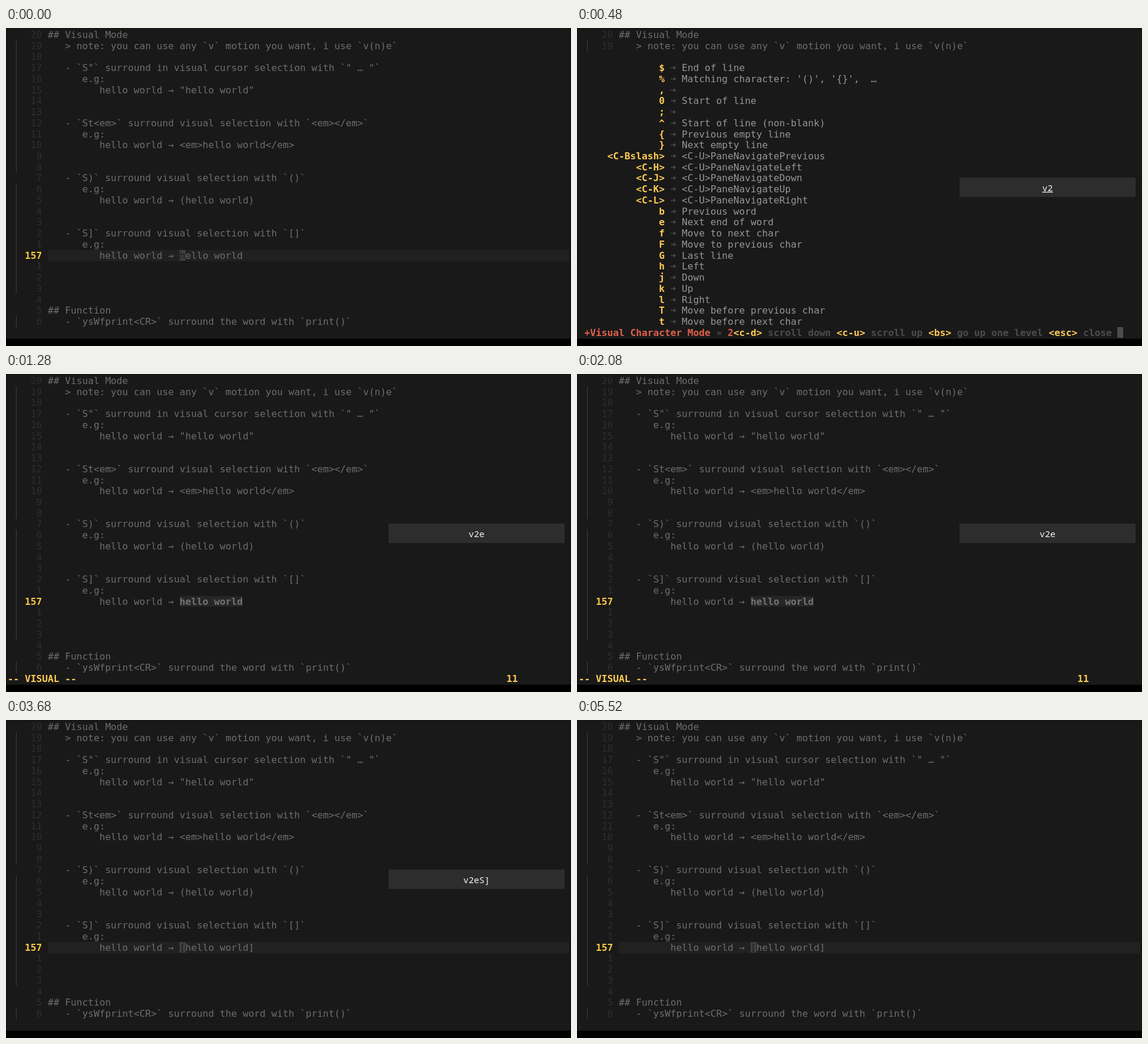
Recreate the animation shown at these times as an HTML page with a canvas. Size 960 px wide and 540 px high, loop 5.6 s.

```html
<!DOCTYPE html>
<html lang="en">
<head>
<meta charset="utf-8">
<title>Surround a selection</title>
<style>
html, body { margin: 0; width: 100%; height: 100%; overflow: hidden; background: #000; }
canvas { display: block; width: 960px; height: 540px; }
</style>
</head>
<body>
<canvas id="stage" width="960" height="540"></canvas>
<script>
const ctx = document.getElementById('stage').getContext('2d');
const LOOP = 5600;
const CW = 9.74, RH = 18.73, LEFT = 2.8, TOP = 2;
const MONO = '"DejaVu Sans Mono", monospace';
const C = {
  bg: '#191919', edge: '#121212', text: '#6d6d6e', num: '#2e2e2e', bar: '#3f3f3f',
  line: '#212121', select: '#262626', strong: '#747475', block: '#404040', ink: '#1d1d1d',
  gold: '#fcc93f', key: '#ffcb55', desc: '#969696', dim: '#4c4c4c', red: '#e0604a'
};

const DOC = [
  '## Visual Mode',
  '   > note: you can use any `v` motion you want, i use `v(n)e`',
  '',
  '   - `S"` surround in visual cursor selection with `" … "`',
  '      e.g:',
  '         hello world → "hello world"',
  '', '',
  '   - `St<em>` surround visual selection with `<em></em>`',
  '      e.g:',
  '         hello world → <em>hello world</em>',
  '', '',
  '   - `S)` surround visual selection with `()`',
  '      e.g:',
  '         hello world → (hello world)',
  '', '',
  '   - `S]` surround visual selection with `[]`',
  '      e.g:',
  '         hello world → ',
  '', '', '', '',
  '## Function',
  '   - `ysWfprint<CR>` surround the word with `print()`'
];

const HINTS = [
  ['$', 'End of line'],
  ['%', "Matching character: '()', '{}',  …"],
  [',', ''],
  ['0', 'Start of line'],
  [';', ''],
  ['^', 'Start of line (non-blank)'],
  ['{', 'Previous empty line'],
  ['}', 'Next empty line'],
  ['<C-Bslash>', '<C-U>PaneNavigatePrevious'],
  ['<C-H>', '<C-U>PaneNavigateLeft'],
  ['<C-J>', '<C-U>PaneNavigateDown'],
  ['<C-K>', '<C-U>PaneNavigateUp'],
  ['<C-L>', '<C-U>PaneNavigateRight'],
  ['b', 'Previous word'],
  ['e', 'Next end of word'],
  ['f', 'Move to next char'],
  ['F', 'Move to previous char'],
  ['G', 'Last line'],
  ['h', 'Left'],
  ['j', 'Down'],
  ['k', 'Up'],
  ['l', 'Right'],
  ['T', 'Move before previous char'],
  ['t', 'Move before next char']
];

const FOOTER = [
  [1, '+Visual Character Mode', C.red], [24, '»', C.dim], [26, '2', C.red],
  [27, '<c-d>', C.key], [33, 'scroll down', C.dim],
  [45, '<c-u>', C.key], [51, 'scroll up', C.dim],
  [61, '<bs>', C.key], [66, 'go up one level', C.dim],
  [82, '<esc>', C.key], [88, 'close', C.dim]
];

const ROW = 20, COL = 30;
const colX = c => LEFT + c * CW;
const rowY = r => TOP + r * RH;
const within = (t, a, b) => t >= a && t < b;

function rect(x, y, w, h, color) {
  ctx.fillStyle = color;
  ctx.fillRect(x, y, w, h);
}

function cells(col, row, count, color) {
  const x = Math.round(colX(col)), y = Math.round(rowY(row));
  rect(x, y, Math.round(colX(col + count)) - x, Math.round(rowY(row + 1)) - y, color);
}

// Each character sits in its own terminal cell.
function put(col, row, str, color, bold) {
  ctx.font = (bold ? 'bold ' : '') + '16.18px ' + MONO;
  ctx.textAlign = 'left';
  ctx.fillStyle = color;
  [...str].forEach((ch, i) => {
    if (ch !== ' ') ctx.fillText(ch, colX(col + i), rowY(row) + 15);
  });
}

function bar(from, to) {
  rect(17, Math.round(rowY(from)), 1, Math.round((to - from) * RH), C.bar);
}

function drawDoc(rows) {
  for (let r = 0; r < rows; r++) {
    const here = r === ROW;
    const n = here ? '157' : String(Math.abs(ROW - r));
    put(6 - n.length, r, n, here ? C.gold : C.num, here);
    put(7, r, DOC[r], C.text);
  }
}

function drawCursor(col, ch) {
  cells(col, ROW, 1, C.block);
  put(col, ROW, ch, C.ink);
}

function drawEditor(t) {
  const visual = within(t, 560, 3360);
  const word = t < 3360 ? 'hello world' : '[hello world]';
  if (!visual) rect(71, Math.round(rowY(ROW)), 886, 19, C.line);
  drawDoc(DOC.length);
  bar(1, 13);
  bar(14, 24);
  bar(26, 27);

  if (visual) cells(COL, ROW, word.length, C.select);
  put(COL, ROW, word, visual ? C.strong : C.text, visual);

  const blinkOff = within(t, 1280, 2160) || within(t, 2880, 3360) || within(t, 4000, 4800);
  if (!blinkOff) {
    const i = visual ? word.length - 1 : 0;
    drawCursor(COL + i, word[i]);
  }
  if (visual) {
    put(0, 27, '-- VISUAL --', C.key, true);
    if (t < 2160) put(87, 27, '11', C.key, true);
  }
}

function drawHints() {
  drawDoc(2);
  bar(1, 2);
  HINTS.forEach(([key, desc], i) => {
    put(15 - key.length, i + 3, key, C.key, true);
    put(16, i + 3, '➜', C.dim);
    put(18, i + 3, desc, C.desc);
  });
  FOOTER.forEach(([col, str, color]) => put(col, 27, str, color, true));
  cells(94, 27, 1, C.dim);
}

function drawKeys(t) {
  if (!within(t, 480, 5520)) return;
  const keys = t < 560 ? 'v2' : t < 2160 ? 'v2e' : t < 3360 ? 'v2eS' : 'v2eS]';
  const fresh = within(t, 480, 800) || within(t, 2160, 2400) || within(t, 3360, 3600);
  rect(650, 254, 299, 33, '#2d2d2d');
  ctx.font = '500 15px "Noto Sans Mono", monospace';
  ctx.textAlign = 'center';
  ctx.fillStyle = '#f4f4f4';
  ctx.fillText(keys, 799.5, 276.5);
  if (fresh) rect(799.5 - keys.length * 4.5, 278, keys.length * 9, 1.3, '#f4f4f4');
}

function draw(t) {
  rect(0, 0, 960, 540, '#000');
  rect(0, 0, 960, 528, C.edge);
  rect(2, 1, 956, 526, C.bg);
  if (within(t, 480, 560)) drawHints();
  else drawEditor(t);
  drawKeys(t);
}

const start = performance.now();
function tick() {
  draw((performance.now() - start) % LOOP);
  requestAnimationFrame(tick);
}
tick();
</script>
</body>
</html>
```
